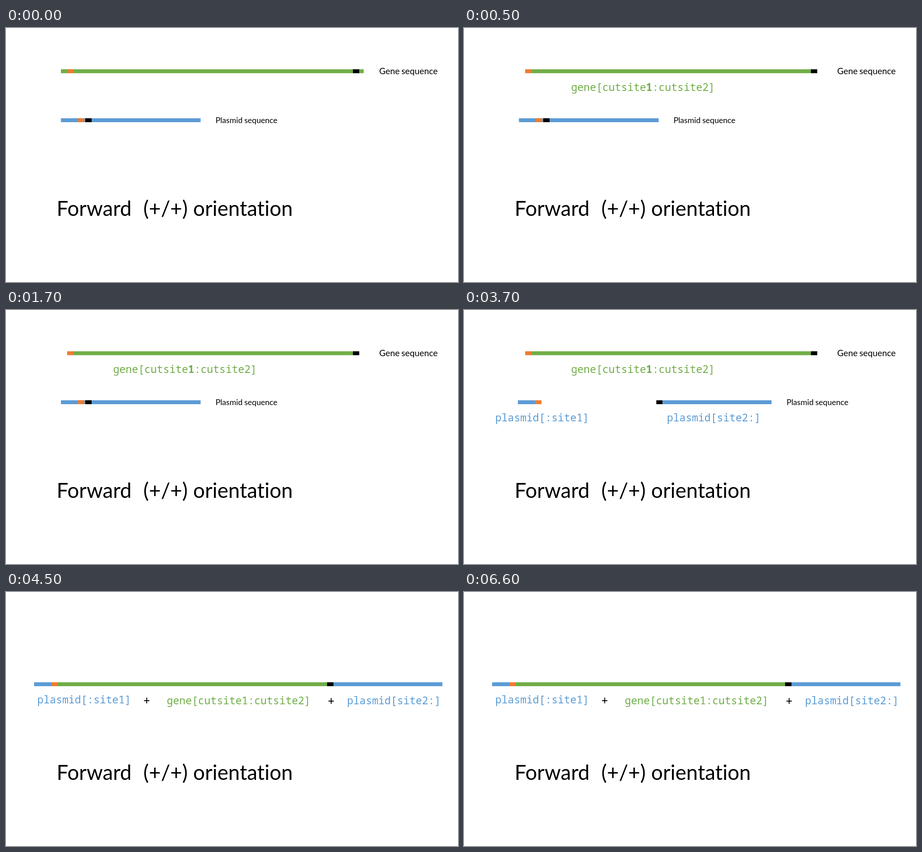
An HTML page for the animation above (8 s loop, 998x561 px).

```html
<!DOCTYPE html>
<html lang="en">
<head>
<meta charset="utf-8">
<title>Forward orientation</title>
<style>
  html, body { margin: 0; width: 100%; height: 100%; overflow: hidden; background: #fff; }
  svg { display: block; width: 998px; height: 561px; }
  text { white-space: pre; font-variant-ligatures: none; }
  .label { font-family: Lato, sans-serif; }
  .code { font-family: "Noto Sans Mono", "DejaVu Sans Mono", monospace; }
</style>
</head>
<body>
<svg id="stage" viewBox="0 0 998 561"></svg>
<script>
const NS = 'http://www.w3.org/2000/svg';
const GREEN = '#70ad47', BLUE = '#5b9bd5', ORANGE = '#ed7d31', BLACK = '#000';
const LOOP = 8000;
const stage = document.getElementById('stage');

function add(parent, tag, attrs = {}, content = '') {
  const el = document.createElementNS(NS, tag);
  for (const key in attrs) el.setAttribute(key, attrs[key]);
  el.textContent = content;
  parent.append(el);
  return el;
}

// Each part of a bar is [left, right, colour].
function bar(g, y, ...parts) {
  for (const [left, right, fill] of parts)
    add(g, 'rect', { x: left, y, width: right - left, height: 8.6, fill });
}

function label(g, y, size, ...words) {
  for (const [x, word] of words)
    add(g, 'text', { class: 'label', x, y, 'font-size': size }, word);
}

const code = (g, x, y, fill, str, size = 23) =>
  add(g, 'text', { class: 'code', x, y, fill, 'font-size': size }, str);
const plus = (g, x, y) => code(g, x, y, BLACK, '+', 27);

const geneLabel = g => label(g, 102, 19.3, [824, 'Gene'], [873, 'sequence']);
const plasmidLabel = (g, x) => label(g, 210, 17.6, [x, 'Plasmid'], [x + 63.5, 'sequence']);

function wholeGene(g) {
  bar(g, 91.2, [121.3, 789.7, GREEN], [135, 149, ORANGE], [766, 780, BLACK]);
  geneLabel(g);
}

function cutGene(g) {
  bar(g, 91.2, [135, 149, ORANGE], [149, 766, GREEN], [766, 780, BLACK]);
  geneLabel(g);
  const text = code(g, 236.5, 139, GREEN, 'gene[cutsite');
  add(text, 'tspan', { 'font-weight': 600 }, '1');
  add(text, 'tspan', {}, ':cutsite2]');
}

function wholePlasmid(g) {
  bar(g, 199.4, [121.3, 429.7, BLUE], [159, 173, ORANGE], [175, 189, BLACK]);
  plasmidLabel(g, 462.7);
}

function cutPlasmid(g) {
  bar(g, 199.4, [119, 157, BLUE], [157, 171, ORANGE], [424.6, 438.6, BLACK], [438.6, 679, BLUE]);
  plasmidLabel(g, 712.2);
  code(g, 69, 246, BLUE, 'plasmid[:site1]');
  code(g, 448, 246, BLUE, 'plasmid[site2:]');
}

function joined(g) {
  bar(g, 199.4, [62, 100, BLUE], [100, 114, ORANGE], [114, 709, GREEN],
    [709, 723, BLACK], [723, 963.6, BLUE]);
  code(g, 69, 246, BLUE, 'plasmid[:site1]');
  plus(g, 302.4, 248.5);
  code(g, 355, 248, GREEN, 'gene[cutsite1:cutsite2]');
  plus(g, 709.7, 249.8);
  code(g, 753, 248, BLUE, 'plasmid[site2:]');
}

const steps = [
  [0, wholeGene, wholePlasmid],
  [500, cutGene, wholePlasmid],
  [2500, cutGene, cutPlasmid],
  [4500, joined],
].map(([start, ...parts]) => {
  const g = add(stage, 'g', { visibility: 'hidden' });
  parts.forEach(draw => draw(g));
  return { start, g };
});

label(stage, 415, 45.6, [111.7, 'Forward'], [303.3, '(+/+)'], [413.3, 'orientation']);

let shown = null;
function show(time) {
  const t = time % LOOP;
  const current = steps.findLast(step => t >= step.start) || steps[0];
  if (current !== shown) {
    for (const step of steps)
      step.g.setAttribute('visibility', step === current ? 'visible' : 'hidden');
    shown = current;
  }
}

let origin = null;
function tick(now) {
  origin ??= now;
  show(now - origin);
  requestAnimationFrame(tick);
}
show(0);
requestAnimationFrame(tick);
</script>
</body>
</html>
```
